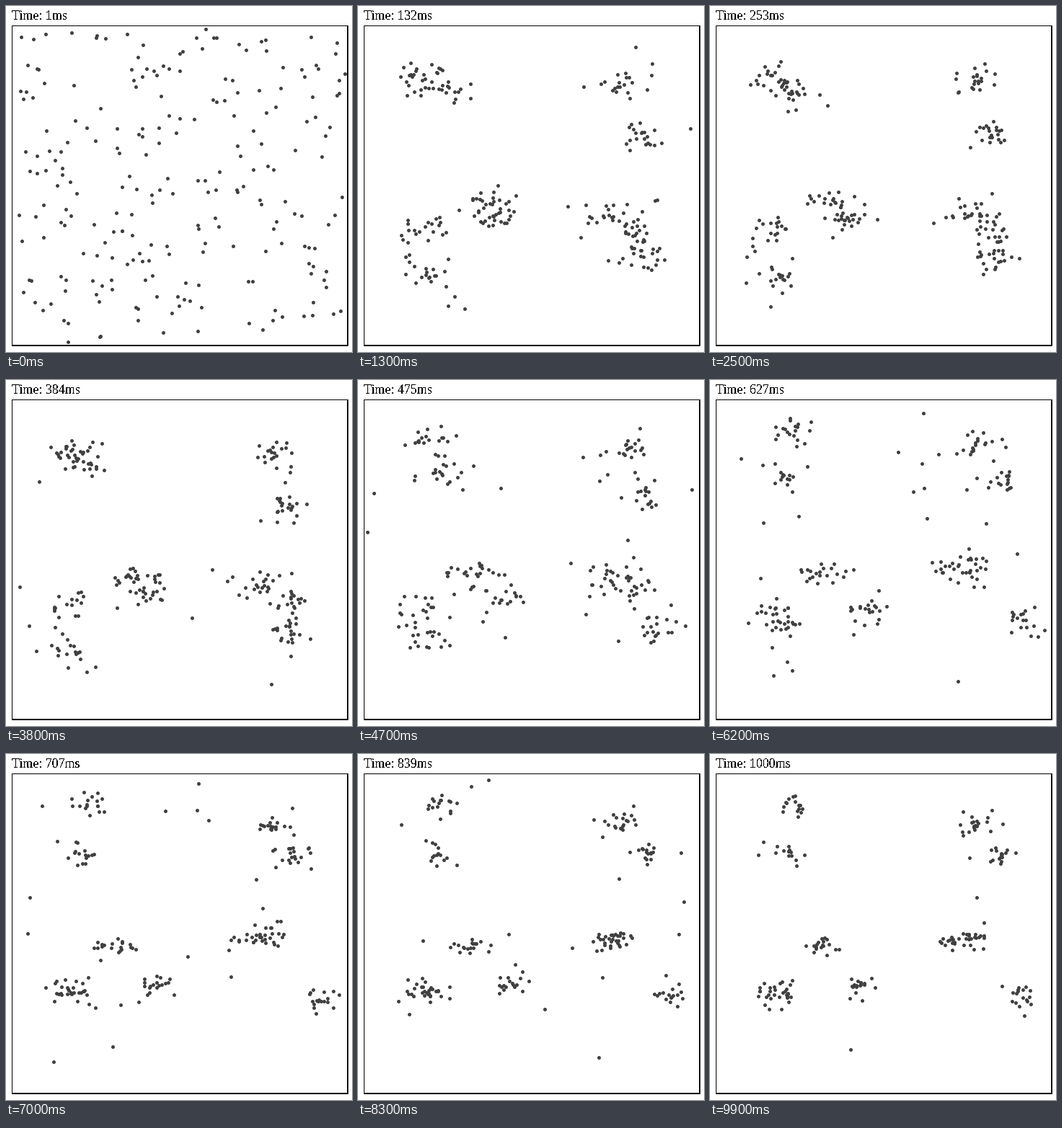
Write a matplotlib script that moves like this. It is 480 by 480 pixels and loops after 10000 ms.

```python
import matplotlib.pyplot as plt
import numpy as np
from matplotlib.animation import FuncAnimation
from matplotlib.patches import Rectangle

SIZE, FRAMES = 480, 100
LOW, HIGH = np.array([12, 31]), np.array([470, 467])
PER_SWARM = 21

# where each swarm gathers, and where it settles later
GATHER = np.array([(85, 100), (118, 115), (369, 104), (390, 178), (172, 272), (193, 293),
                   (84, 312), (88, 374), (350, 285), (392, 310), (392, 350)])
SETTLE = np.array([(117, 71), (105, 137), (367, 95), (403, 139), (153, 267), (211, 318),
                   (84, 326), (102, 335), (335, 258), (365, 255), (432, 335)])

rng = np.random.default_rng(11)
N = PER_SWARM * len(GATHER)


def smooth(x):
    x = np.clip(x, 0, 1)
    return x * x * (3 - 2 * x)


def assign(points):
    """Give every point the closest swarm that still has room."""
    dist = np.linalg.norm(points[:, None] - GATHER, axis=2)
    group, room = np.full(N, -1), [PER_SWARM] * len(GATHER)
    for k in np.argsort(dist, axis=None):
        p, g = divmod(k, len(GATHER))
        if group[p] < 0 and room[g]:
            group[p] = g
            room[g] -= 1
    return group


start = rng.uniform(LOW, HIGH, (N, 2))
group = assign(start)

# each body circles its swarm on a random ellipse, slower further out
axis_a, axis_b = rng.normal(0, 0.65, (2, N, 2)) * rng.lognormal(0, 0.35, (N, 1))
reach = np.hypot(*axis_a.T) + np.hypot(*axis_b.T)
omega = rng.choice([-1, 1], N) * 0.55 / (0.5 + 0.6 * reach)
fall = rng.uniform(9, 14, N)

# some bodies get flung out of their swarm
launch = np.where(rng.random(N) < 0.2, np.maximum(rng.normal(47, 15, N), 12), np.inf)
heading = rng.uniform(0, 2 * np.pi, N)
velocity = rng.uniform(5, 11, (N, 1)) * np.column_stack([np.cos(heading), np.sin(heading)])


def spread(t):
    """Swarms tighten with time, but swell while they pass each other."""
    return 0.95 + np.exp(-t / 30) + 0.6 * np.exp(-((t - 53) / 9) ** 2)


def positions(frame):
    t = np.minimum(frame, launch)[:, None]
    phase = omega[:, None] * t
    swing = axis_a * np.cos(phase) + axis_b * np.sin(phase)
    centre = GATHER[group] + (SETTLE - GATHER)[group] * smooth((t - 36) / 24)
    orbit = np.clip(centre + np.array([16, 12]) * spread(t) * swing, LOW, HIGH)
    pos = start + (orbit - start) * smooth(t / fall[:, None]) + velocity * (frame - t)
    inside = np.all((pos >= LOW) & (pos <= HIGH), axis=1)
    return np.floor(pos[inside]) + 0.5


fig = plt.figure(figsize=(SIZE / 72, SIZE / 72), dpi=72, facecolor="white")
ax = fig.add_axes([0, 0, 1, 1])
ax.set(xlim=(0, SIZE), ylim=(SIZE, 0))
ax.axis("off")
# the frame is thinner on its left and top sides
ax.add_patch(Rectangle((8, 27), 467, 445, color="black", lw=0))
ax.add_patch(Rectangle((9, 28), 464, 442, color="white", lw=0))
dots, = ax.plot([], [], "o", ms=5, mew=0, color="#404040", antialiased=False)
label = ax.text(8, 19, "", family="Liberation Serif", size=18, antialiased=False)


def update(frame):
    dots.set_data(*positions(frame).T)
    label.set_text(f"Time: {round(1 + frame * 999 / (FRAMES - 1))}ms")
    return dots, label


anim = FuncAnimation(fig, update, frames=FRAMES, interval=100,
                     repeat=True, repeat_delay=0)
plt.show()
```
